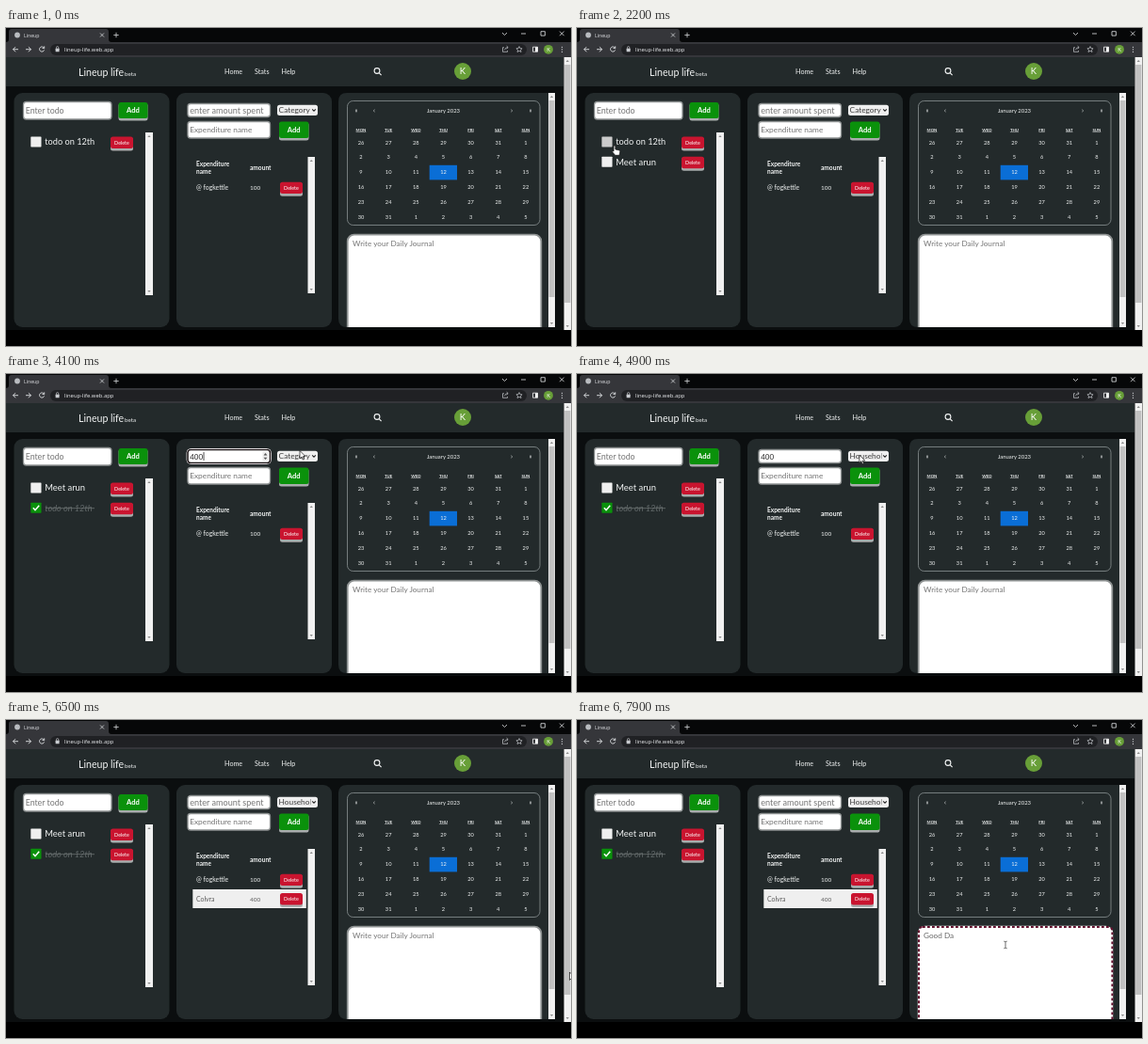
Animation, 600 px wide and 338 px high, one loop 8000 ms. Source, as an HTML page:

```html
<!DOCTYPE html>
<html lang="en">
<head>
<meta charset="utf-8">
<title>Lineup</title>
<style>
  html, body { margin: 0; width: 100%; height: 100%; overflow: hidden; background: #000; }
  svg { display: block; width: 600px; height: 338px; }
  text { font-family: Lato, "Open Sans", sans-serif; white-space: pre; }
  .ui { font-family: "Open Sans", "Noto Sans", sans-serif; }
</style>
</head>
<body>
<svg id="stage" viewBox="0 0 600 338"></svg>
<script>
const LOOP = 8000, STEP = 100;
const PANEL = '#232a2b', INK = '#f2f4f4', HINT = '#757575', GREEN = '#0a910b', RED = '#c9142f';
const stage = document.getElementById('stage');

function el(tag, attrs, parent = stage) {
  const node = document.createElementNS('http://www.w3.org/2000/svg', tag);
  for (const k in attrs) node.setAttribute(k, attrs[k]);
  parent.appendChild(node);
  return node;
}
const group = (parent = stage) => el('g', {}, parent);
const rect = (x, y, width, height, fill, rx = 0, more = {}, parent = stage) =>
  el('rect', { x, y, width, height, fill, rx, ...more }, parent);
const line = (d, stroke = INK, width = 1, parent = stage, more = {}) =>
  el('path', { d, stroke, fill: 'none', 'stroke-width': width, ...more }, parent);
const circle = (cx, cy, r, fill) => el('circle', { cx, cy, r, fill });
function text(x, y, str, size, fill = INK, more = {}, parent = stage) {
  const node = el('text', { x, y, 'font-size': size, fill, ...more }, parent);
  node.textContent = str;
  return node;
}
const mid = { 'text-anchor': 'middle' }, bold = { 'font-weight': 700 };
const show = (node, on) => node.setAttribute('display', on ? 'inline' : 'none');

function button(x, y, w, h, label, fill, size, parent = stage) {
  rect(x, y + 1, w, h + 1.6, '#a9adad', 2.5, {}, parent);
  rect(x, y, w, h, fill, 2.5, {}, parent);
  const weight = size > 6 ? bold : {};
  text(x + w / 2, y + h / 2 + size * .36, label, size, '#fff', { ...mid, ...weight }, parent);
}
const del = (x, y, parent) => button(x, y, 24, 12.4, 'Delete', RED, 5.4, parent);

function scrollbar(x, y, w, h, thumbTop, thumbEnd) {
  rect(x, y, w, h, '#f1f1f1');
  if (thumbEnd) rect(x + .6, thumbTop, w - 1.2, thumbEnd - thumbTop, '#c1c1c1');
  const c = x + w / 2;
  for (const [ty, dir] of [[y + 4, 1], [y + h - 4, -1]])
    el('path', { d: `M${c - 1.6} ${ty + dir} h3.2 l-1.6 ${-2 * dir} z`, fill: '#8a8a8a' });
}

// An input with a focus ring, text and caret
function field(x, y, w, h, hint, hintSize, textSize, ringInk) {
  const edge = rect(x, y, w, h, '#fff', 3, { stroke: '#8f9393', 'stroke-width': 1.3 });
  const ring = group();
  rect(x - .9, y - .9, w + 1.8, h + 1.8, 'none', 4, { stroke: '#f4eef0', 'stroke-width': 1 }, ring);
  rect(x + .1, y + .1, w - .2, h - .2, '#fff', 3, { stroke: ringInk, 'stroke-width': 1.4 }, ring);
  const base = y + h / 2 + 3.1, left = x + 2.2;
  const ghost = text(left, base, hint, hintSize, HINT);
  const value = text(left, base, '', textSize, '#2b2b2b');
  const caret = rect(0, y + h / 2 - 4.5, .8, 9, '#222');
  return (str, focused) => {
    value.textContent = str;
    show(ghost, !str);
    show(edge, !focused);
    show(ring, focused);
    show(caret, focused);
    caret.setAttribute('x', left + (str ? value.getComputedTextLength() : 0) + .5);
  };
}

// Browser frame
rect(0, 0, 600, 31, '#060708');
el('path', { d: 'M0 15 q3 0 3 -3 V4 q0 -3 3 -3 H106 q3 0 3 3 V12 q0 3 3 3 H600 V31 H0 z', fill: '#35363a' });
circle(12, 7.5, 2.9, '#b9bcc0');
text(19, 9.6, 'Lineup', 5.2, '#e3e5e8', { class: 'ui' });
line('M100 5.5 l4 4 m0 -4 l-4 4', '#d5d7da', .8);
line('M117 4.8 v5.4 m-2.7 -2.7 h5.4', '#d5d7da', .8);
line('M527 5 l2.5 2.5 2.5 -2.5 M547 6 h5 M568 3.7 h4.4 v4.4 h-4.4 z M588 3.6 l4.6 4.6 m0 -4.6 l-4.6 4.6', '#e3e5e8', .8);
rect(47, 17, 506, 12, '#202124', 6);
line('M13 22.7 h-5.5 m2.6 -2.6 l-2.6 2.6 2.6 2.6 M21 22.7 h5.5 m-2.6 -2.6 l2.6 2.6 -2.6 2.6', '#dfe1e4', .9);
line('M40.4 21.2 a2.6 2.6 0 1 0 .2 2.2 M40.7 19.4 v2.2 h-2.2', '#dfe1e4', .9);
rect(52.6, 21.8, 4, 3.4, '#c9ccd0', .5);
line('M53.4 22 v-1.2 a1.2 1.2 0 0 1 2.4 0 v1.2', '#c9ccd0', .7);
text(62, 24.8, 'lineup-life.web.app', 5.9, '#e8eaed', { class: 'ui' });
line('M529 20.7 h-1.5 v4.6 h5 v-1.4 M529.5 23.3 q.3 -2.5 3.5 -2.7 m-1.4 -1.5 l1.6 1.5 -1.6 1.5', '#c9ccd0', .7);
line('M545 19.6 l.9 2 2.2 .2 -1.6 1.5 .5 2.2 -2 -1.2 -2 1.2 .5 -2.2 -1.6 -1.5 2.2 -.2 z', '#c9ccd0', .7);
line('M559.5 20.2 h5 v5 h-5 z', '#f1f1f1', .8);
rect(562, 20.2, 2.8, 5, '#f1f1f1');
circle(576, 22.8, 4.9, '#689f38');
text(576, 24.8, 'K', 5.6, '#fff', mid);
for (const y of [20.3, 22.8, 25.3]) circle(590.5, y, .65, '#dfe1e4');

// Page header
rect(0, 31, 592, 290, '#0b0e0f');
rect(0, 31, 592, 31, PANEL);
text(77, 50.5, 'Lineup life', 10.6);
text(126, 50.5, 'beta', 6.2);
text(232, 49.3, 'Home', 7.2);
text(264, 49.3, 'Stats', 7.2);
text(292.5, 49.3, 'Help', 7.2);
el('circle', { cx: 394, cy: 45.5, r: 2.9, fill: 'none', stroke: INK, 'stroke-width': 1.1 });
line('M396.1 47.6 l2.5 2.5', INK, 1.2);
circle(485, 46, 9, '#689f38');
text(485, 49.4, 'K', 9.5, '#fff', mid);
scrollbar(592.5, 31, 7.5, 290, 39, 292);

// Panels
rect(8.5, 69, 165, 249, PANEL, 9);
rect(181, 69, 165, 249, PANEL, 9);
el('path', { d: 'M583 69 H362 q-9 0 -9 9 V309 q0 9 9 9 H583 z', fill: PANEL });
scrollbar(576, 69, 7, 249, 77, 286);

// Todo panel
const todo = field(18.5, 78.5, 93.5, 18.5, 'Enter todo', 8.8, 8.3, '#5a1029');
button(119.5, 79, 31, 17, 'Add', GREEN, 7.6);
scrollbar(148, 111, 8, 173);
function item(label, size) {
  const g = group();
  const box = rect(26.3, 115.4, 11.2, 11, '#efefef', .6, {}, g);
  const tick = line('M28.8 121 l2.2 2.4 4.2 -5', '#fff', 1.5, g);
  const name = text(41.3, 124.3, label, size, INK, {}, g);
  const strike = line('M42 121.4 H94', '#6b7273', .8, g);
  del(111, 115.5, g);
  return (row, done, hover) => {
    g.setAttribute('transform', `translate(0 ${row * 21.3})`);
    box.setAttribute('fill', done ? GREEN : hover ? '#cbcbcb' : '#efefef');
    name.setAttribute('fill', done ? '#606768' : INK);
    name.setAttribute('font-style', done ? 'italic' : 'normal');
    show(tick, done);
    show(strike, done);
    show(g, row >= 0);
  };
}
const oldItem = item('todo on 12th', 9.2), newItem = item('Meet arun', 9.4);

// Spending panel
const amount = field(193, 80.5, 87.5, 14, 'enter amount spent', 9.1, 8, '#1b1416');
const spinner = group();
rect(272.5, 82.5, 6, 10, '#ececec', 0, {}, spinner);
el('path', { d: 'M273.6 86.4 h3.8 l-1.9 -2.3 z M273.6 88.8 h3.8 l-1.9 2.3 z', fill: '#555' }, spinner);
rect(288, 81.8, 43, 11.2, '#efefef', 2.5);
const category = text(289.6, 90.2, '', 8.3, '#3c3c3c');
rect(323.5, 82.5, 7, 9.8, '#efefef', 2);
line('M325.2 86.4 l1.8 1.9 1.8 -1.9', '#222', 1.1);
const spend = field(193, 99.5, 87.5, 17.5, 'Expenditure name', 8.3, 8.3, '#1b1416');
button(290, 99.5, 31.5, 17.5, 'Add', GREEN, 7.6);
text(202, 146.6, 'Expenditure', 6.5, INK, bold);
text(202, 154.6, 'name', 6.5, INK, bold);
text(259, 150.6, 'amount', 6.6, INK, bold);
function expense(y, name, sum, fill, parent = stage) {
  text(202, y, name, 6.9, fill, {}, parent);
  text(259, y, sum, 6.5, fill, {}, parent);
  del(291, y - 8.6, parent);
}
expense(172.3, '@ fogkettle', '100', INK);
const added = group();
rect(198.3, 180, 120.5, 20, '#efefef', 0, {}, added);
expense(192.6, 'Colvra', '400', '#5b5b5b', added);
scrollbar(320.5, 137, 7.5, 145);

// Calendar
rect(362.5, 77.5, 204.5, 132, 'none', 6, { stroke: '#8b9293', 'stroke-width': .8 });
text(464.5, 90, 'January 2023', 5.9, INK, mid);
[['«', 372], ['‹', 391], ['›', 537], ['»', 557]].forEach(([s, x]) => text(x, 90, s, 7, INK, mid));
rect(449.7, 145.8, 29.3, 15.6, '#0a6ed6');
const col = i => 377 + i % 7 * 29.15;
['MON', 'TUE', 'WED', 'THU', 'FRI', 'SAT', 'SUN'].forEach((d, i) =>
  text(col(i), 109.6, d, 4.3, INK, { ...mid, ...bold, 'text-decoration': 'underline' }));
for (let i = 0; i < 42; i++)
  text(col(i), 123.6 + Math.floor(i / 7) * 15.85, (25 + i) % 31 + 1, 5.7, INK, mid);

// Journal
const clip = el('clipPath', { id: 'page' });
rect(353, 69, 223, 249, '#fff', 0, {}, clip);
const journal = el('g', { 'clip-path': 'url(#page)' });
const sheet = rect(362.7, 219.7, 205.6, 120, '#fff', 7, { stroke: '#8f9393', 'stroke-width': 1.8 }, journal);
const dashes = rect(363, 220, 205.4, 120, 'none', 4,
  { stroke: '#651330', 'stroke-width': 2, 'stroke-dasharray': '2.8 2.2' }, journal);
const note = text(368, 232.3, '', 8.2, HINT, {}, journal);

// Pointers, each with its hot spot at 0,0
const pointers = {
  arrow: group(), hand: group(), beam: group()
};
const outline = { fill: '#fff', stroke: '#111', 'stroke-width': .7, 'stroke-linejoin': 'round' };
el('path', { d: 'M0 0 V8.4 L2 6.6 3.3 9.6 4.6 9 3.4 6.1 H6 z', ...outline }, pointers.arrow);
el('path', { d: 'M-1 .8 a.9 .9 0 0 1 1.8 0 V4 l4 1 q1 .4 .9 1.6 L5 10.3 H.6 L-2.6 6.6 q-.2 -1.2 1.6 -.6 z', ...outline }, pointers.hand);
line('M-1.7 -3.8 q1.7 0 1.7 1 V2.8 q0 1 -1.7 1 M1.7 -3.8 q-1.7 0 -1.7 1 M1.7 3.8 q-1.7 0 -1.7 -1', '#444', .8, pointers.beam);

// time, x, y, pointer from that time on
const path = [
  [300, 304, 176, 'arrow'], [600, 70, 92, 'beam'], [800, 47, 85.5, 'beam'],
  [1800, 47, 85.5, 'arrow'], [2100, 40, 125, 'hand'], [2700, 40, 125, 'arrow'],
  [3200, 230, 88, 'beam'], [3900, 230, 88, 'arrow'], [4100, 312, 81.5, 'arrow'],
  [4800, 312, 81.5, 'arrow'], [5200, 234, 110.5, 'beam'], [6100, 234, 110.5, 'arrow'],
  [6500, 598.5, 268, 'arrow'], [6600, 598.5, 268, 'arrow'], [7100, 455, 239, 'beam'], [LOOP, 455, 239, 'beam']
];
const ease = p => p * p * (3 - 2 * p);

function movePointer(t) {
  const i = path.findIndex(([at], n) => t >= at && t < path[n + 1]?.[0]);
  for (const k in pointers) show(pointers[k], i >= 0 && path[i][3] === k);
  if (i < 0) return;
  const [t0, x0, y0, kind] = path[i], [t1, x1, y1] = path[i + 1];
  const p = ease((t - t0) / (t1 - t0));
  pointers[kind].setAttribute('transform', `translate(${x0 + (x1 - x0) * p} ${y0 + (y1 - y0) * p})`);
}

const typed = (str, t, start, gap) => str.slice(0, Math.max(0, Math.floor((t - start) / gap) + 1));
const within = (t, a, b) => t >= a && t < b;

function render(t) {
  const listed = t >= 1800, done = t >= 2400, saved = t >= 6100;
  todo(listed ? '' : typed('Meet arun', t, 700, 100), within(t, 600, 1800));
  oldItem(done ? 1 : 0, done, within(t, 2100, 2400));
  newItem(!listed ? -1 : done ? 0 : 1, false, within(t, 2400, 2700));

  const onAmount = within(t, 3200, 4300);
  amount(saved ? '' : typed('400', t, 3600, 100), onAmount);
  show(spinner, onAmount);
  category.textContent = t < 4800 ? 'Category' : 'Househol';
  spend(saved ? '' : typed('Colvra', t, 5400, 100), within(t, 5200, 6100));
  show(added, saved);

  const writing = t >= 7100;
  show(dashes, writing);
  sheet.setAttribute('stroke', writing ? '#fff' : '#8f9393');
  note.textContent = typed('Good Da', t, 7400, 75) || 'Write your Daily Journal';
  note.setAttribute('fill', t >= 7400 ? '#666' : HINT);
  movePointer(t);
}

const begin = performance.now();
function tick() {
  const t = (performance.now() - begin) % LOOP;
  render(Math.floor(t / STEP) * STEP);
  requestAnimationFrame(tick);
}
tick();
</script>
</body>
</html>
```
